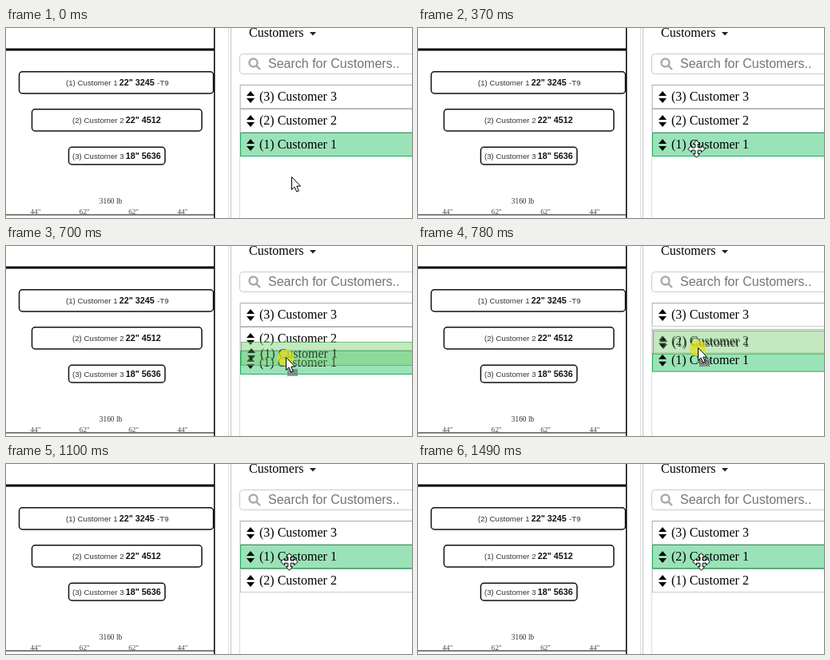
Recreate the animation shown at these times as an HTML page with a canvas. Size 508 px wide and 238 px high, loop 2.12 s.

```html
<!DOCTYPE html>
<html>
<head>
<meta charset="utf-8">
<style>
html, body { margin: 0; width: 100%; height: 100%; overflow: hidden; background: #fff; }
canvas { display: block; width: 508px; height: 238px; }
</style>
</head>
<body>
<canvas id="stage" width="508" height="238"></canvas>
<script>
const ctx = document.getElementById('stage').getContext('2d');
const SERIF = '"Liberation Serif", Times, serif';
const SANS = '"Liberation Sans", Arial, sans-serif';
const LOOP = 2120;
const GREEN = '#9ae3b8', EDGE = '#22ad60';

// Screen refresh moments: the pointer is sampled at each one
const TICKS = [0, 70, 145, 220, 295, 370, 460, 610, 700, 780, 850, 930, 1100, 1400, 1490];
const POINTER = [
  [0, 357, 186], [70, 356, 182], [145, 354, 173], [220, 351, 163], [295, 349, 155],
  [370, 348, 151], [460, 347, 150], [610, 348, 147], [700, 350, 139], [780, 350, 127],
  [850, 352, 124], [930, 354, 121], [1100, 354, 122]
];

function text(str, x, y, font, color = '#000', align = 'left') {
  ctx.font = font;
  ctx.fillStyle = color;
  ctx.textAlign = align;
  ctx.fillText(str, x, y);
}

function rect(x, y, w, h, color) {
  ctx.fillStyle = color;
  ctx.fillRect(x, y, w, h);
}

function poly(points, fill, stroke) {
  ctx.beginPath();
  points.forEach(([x, y]) => ctx.lineTo(x, y));
  ctx.closePath();
  if (fill) { ctx.fillStyle = fill; ctx.fill(); }
  if (stroke) { ctx.strokeStyle = stroke; ctx.lineWidth = 1; ctx.stroke(); }
}

function roundBox(x, y, w, h, r, color, width) {
  ctx.beginPath();
  ctx.roundRect(x, y, w, h, r);
  ctx.strokeStyle = color;
  ctx.lineWidth = width;
  ctx.stroke();
}

function load(x, y, w, h, label, labelX, base, size, tail) {
  roundBox(x, y, w, h, 4, '#111', 1.5);
  text(label, labelX, base, '9.7px ' + SANS, '#333');
  text(size, labelX + 66.7, base, 'bold 10.8px ' + SANS, '#111');
  if (tail) text(tail, labelX + 114, base, '9.7px ' + SANS, '#333');
}

function plan(a, b) {
  rect(0, 25.5, 261, 3, '#000');
  load(16.5, 54.8, 243, 27.2, `(${a}) Customer 1`, 75, 72, '22" 3245', '-T9');
  load(32.5, 101.8, 212.5, 27.2, `(${b}) Customer 2`, 83, 119, '22" 4512');
  load(78.5, 149.3, 120.5, 21.7, '(3) Customer 3', 83, 164, '18" 5636');
  text('3160 lb', 131, 220, '9.4px ' + SERIF, '#333', 'center');
  ['44"', '62"', '62"', '44"'].forEach((s, i) =>
    text(s, 37 + i * 61.3, 233, '9.2px ' + SERIF, '#444', 'center'));
  rect(0, 233.5, 261, 1, '#000');
}

function header() {
  rect(260, 0, 1.5, 238, '#000');
  rect(278, 0, 1, 238, '#ddd');
  rect(281, 0, 1, 238, '#c4c4c4');
  text('Customers', 304, 11, '16px ' + SERIF);
  poly([[380, 5], [388, 5], [384, 9.5]], '#222');
  roundBox(292.5, 32.5, 230, 25, 4, '#ccc', 1);
  ctx.beginPath();
  ctx.arc(309.5, 43.5, 5, 0, Math.PI * 2);
  ctx.moveTo(313.3, 47.3);
  ctx.lineTo(318, 52);
  ctx.strokeStyle = '#aaa';
  ctx.lineWidth = 2.4;
  ctx.stroke();
  text('Search for Customers..', 328, 50, '16px ' + SANS, '#757575');
}

function rowLabel(x, y, label) {
  poly([[x + 8, y + 14], [x + 18, y + 14], [x + 13, y + 8]], '#000');
  poly([[x + 8, y + 17], [x + 18, y + 17], [x + 13, y + 23]], '#000');
  text(label, x + 24, y + 20, '16px ' + SERIF);
}

function row(y, label, active) {
  rect(293, y, 215, 30, active ? EDGE : '#ccc');
  if (!active) rect(293, y, 215, 1, '#aaa');
  rect(294, y + 1, 214, 28, active ? GREEN : '#fff');
  rowLabel(293, y, label);
}

function ghost(dx, y) {
  const x = 293 + dx;
  ctx.save();
  ctx.globalAlpha = 0.45;
  rect(x, y, 215, 30, 'rgb(125,205,115)');
  ctx.globalAlpha = 0.6;
  ctx.lineWidth = 1;
  ctx.strokeStyle = '#3fa844';
  ctx.strokeRect(x + 0.5, y + 0.5, 220, 29);
  ctx.globalAlpha = 0.7;
  rowLabel(x, y, '(1) Customer 1');
  ctx.restore();
}

function list(t) {
  const changed = t >= 1400;
  // The two lower rows trade places while dragging
  const swap = t < 780 ? 0 : t < 850 ? 0.11 : t < 930 ? 0.65 : 1;
  rect(292, 71, 1, 167, '#ddd');
  row(71, '(3) Customer 3', false);
  row(131 - 30 * swap, changed ? '(2) Customer 1' : '(1) Customer 1', true);
  row(101 + 30 * swap, changed ? '(1) Customer 2' : '(2) Customer 2', false);
  if (swap === 1) rect(293, 130, 215, 1, EDGE);
}

function arrow(x, y) {
  const shape = [[0, 0], [0, 16], [3.6, 12.6], [6.2, 18.6], [8.8, 17.5], [6.3, 11.6], [11, 11.6]];
  poly(shape.map(([a, b]) => [x + a + 0.5, y + b + 0.5]), '#fff', '#000');
}

function moveCross(x, y) {
  const arm = [[-1.6, -2], [-1.6, -6], [-4.2, -6], [0, -10.8], [4.2, -6], [1.6, -6], [1.6, -2]];
  const points = [];
  for (let k = 0; k < 4; k++) {
    const c = Math.round(Math.cos(k * Math.PI / 2)), s = Math.round(Math.sin(k * Math.PI / 2));
    arm.forEach(([a, b]) => points.push([x + a * c - b * s, y + a * s + b * c]));
  }
  poly(points, '#fff', '#000');
}

function halo(x, y) {
  ctx.beginPath();
  ctx.arc(x, y, 10.5, 0, Math.PI * 2);
  ctx.fillStyle = 'rgba(226,224,30,0.75)';
  ctx.fill();
}

function dragMark(x, y) {
  ctx.save();
  rect(x, y, 13, 9, 'rgba(255,255,255,0.5)');
  ctx.setLineDash([1, 1]);
  ctx.lineWidth = 1;
  ctx.strokeStyle = '#333';
  for (let r = 0; r < 9; r++) {
    ctx.lineDashOffset = r % 2;
    ctx.beginPath();
    ctx.moveTo(x, y + r + 0.5);
    ctx.lineTo(x + 13, y + r + 0.5);
    ctx.stroke();
  }
  ctx.restore();
}

function pointer(t) {
  const [, x, y] = POINTER.filter(p => p[0] <= t).pop();
  const pressed = t >= 610 && t < 1100, dragging = t >= 700 && t < 1100;
  if (pressed) halo(x, y + 1);
  if (dragging) dragMark(x + 2, y + 15);
  if (t < 220 || dragging) arrow(x, y);
  else moveCross(x + 0.5, y + 0.5);
  if (pressed && !dragging) {
    ctx.save();
    ctx.globalCompositeOperation = 'multiply';
    ctx.globalAlpha = 0.5;
    halo(x, y);
    ctx.restore();
  }
}

function draw(now) {
  const time = now % LOOP;
  const t = TICKS.filter(k => k <= time).pop();
  rect(0, 0, 508, 238, '#fff');
  // The plan is cleared for a moment before it shows the new order
  if (t < 1400) plan(1, 2);
  else if (t >= 1490) plan(2, 1);
  header();
  list(t);
  if (t === 700) ghost(1, 120);
  if (t === 780) ghost(1, 106);
  if (t === 850) ghost(3, 104);
  if (t === 930) ghost(5, 102);
  pointer(t);
}

let start;
function frame(now) {
  if (start === undefined) start = now;
  draw(Math.max(0, now - start));
  requestAnimationFrame(frame);
}
draw(0);
requestAnimationFrame(frame);
</script>
</body>
</html>
```
